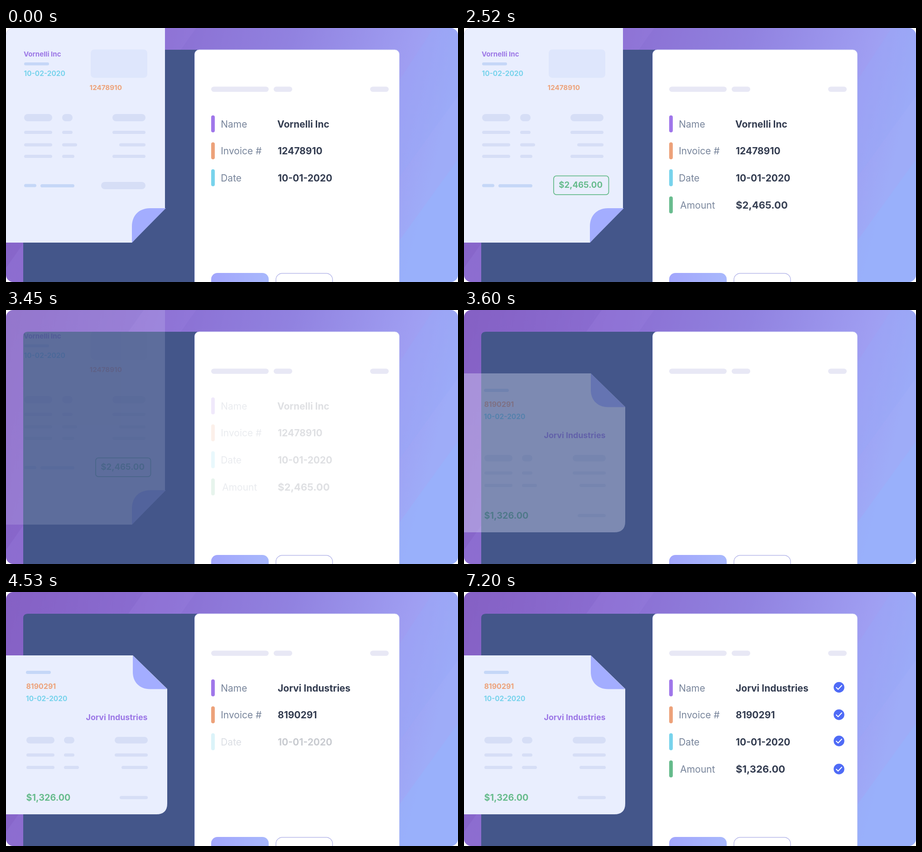
An HTML page that plays this animation: 998 px wide and 561 px high, repeating every 7.23 s.

```html
<!DOCTYPE html>
<html lang="en">
<head>
<meta charset="utf-8">
<title>Invoice capture</title>
<style>
  html, body { margin: 0; width: 100%; height: 100%; overflow: hidden; background: #fff; }
  svg { display: block; width: 998px; height: 561px; }
  text { font-family: Inter, "Open Sans", sans-serif; font-weight: 700; }
  .label { font-weight: 400; }
</style>
</head>
<body>
<svg id="stage" viewBox="0 0 998 561" xmlns="http://www.w3.org/2000/svg">
  <defs>
    <clipPath id="frame"><rect width="998" height="561" rx="16"/></clipPath>
    <linearGradient id="sky" gradientUnits="userSpaceOnUse" x1="0" y1="0" x2="960" y2="260">
      <stop offset="0" stop-color="#8560c4"/>
      <stop offset=".32" stop-color="#8a6dd1"/>
      <stop offset=".62" stop-color="#9182e0"/>
      <stop offset=".88" stop-color="#9f9ef2"/>
      <stop offset="1" stop-color="#9eacf8"/>
    </linearGradient>
    <linearGradient id="primary">
      <stop offset="0" stop-color="#a2a6fc"/>
      <stop offset="1" stop-color="#a8b8fc"/>
    </linearGradient>
  </defs>
  <g clip-path="url(#frame)">
    <rect width="998" height="561" fill="url(#sky)"/>
    <path d="M868 116L944 0H998V150L868 330Z" fill="#94a6f5" opacity=".35"/>
    <path d="M868 470L998 290V561H868Z" fill="#93b3fc" opacity=".45"/>
    <path d="M270 48L304 0H420L386 48ZM0 530L38 476V561H0Z" fill="#9a80e0" opacity=".25"/>
    <path d="M38 561V58Q38 48 48 48H430V561Z" fill="#44568a"/>
    <rect x="416.5" y="48" width="452" height="540" rx="10" fill="#fff" stroke="#cdd0f3"/>
    <g id="panel"></g>
    <rect x="453" y="541" width="127" height="40" rx="14" fill="url(#primary)"/>
    <rect x="596" y="541.8" width="125" height="40" rx="14" fill="#fff" stroke="#a9abe6" stroke-width="1.2"/>
    <g id="docA"></g>
    <g id="docB"></g>
  </g>
</svg>
<script>
const LOOP = 7230;
const PURPLE = '#9b76e6', ORANGE = '#eda27a', CYAN = '#78d3ec', GREEN = '#66bb8c';
const PAPER = '#e9eefe', BAR = '#d6def6', BLUE_BAR = '#c5d7f7', FOLD = '#a3adff';
const byId = id => document.getElementById(id);

function add(parent, tag, attrs, content) {
  const el = document.createElementNS('http://www.w3.org/2000/svg', tag);
  for (const key in attrs) el.setAttribute(key, attrs[key]);
  if (content) el.textContent = content;
  parent.appendChild(el);
  return el;
}
const group = parent => add(parent, 'g', {});
const path = (parent, d, fill) => add(parent, 'path', { d, fill });
const pill = (parent, x, y, right, height, fill = BAR) =>
  add(parent, 'rect', { x, y, width: right - x, height, rx: height / 2, fill });
const write = (parent, x, y, size, fill, content, extra) =>
  add(parent, 'text', { x, y, 'font-size': size, fill, ...extra }, content);
// Draws one table line: three pills at the same height.
const tableLine = (parent, y, height, ...spans) =>
  spans.forEach(([x, right]) => pill(parent, x, y, right, height));

// First invoice
const docA = byId('docA');
path(docA, 'M0 0H351V398L278 474H0Z', PAPER);
path(docA, 'M353 398L278 474V438C278 414 294 398 318 398Z', FOLD);
write(docA, 39, 63, 15.1, PURPLE, 'Vornelli Inc');
pill(docA, 40, 76, 95, 6.5, BLUE_BAR);
write(docA, 39.6, 105.8, 15.4, CYAN, '10-02-2020');
add(docA, 'rect', { x: 187, y: 47.5, width: 125, height: 62.5, rx: 8, fill: '#dee6fc' });
write(docA, 184.6, 137.3, 15.2, ORANGE, '12478910');
tableLine(docA, 190, 16, [40, 102], [124, 147], [235, 308]);
tableLine(docA, 227, 7, [40, 102], [124, 147], [235, 308]);
tableLine(docA, 254.5, 7, [40, 102], [124, 157], [250, 308]);
tableLine(docA, 280, 7, [40, 102], [124, 151], [235, 308]);
pill(docA, 40, 344.5, 67, 7, BLUE_BAR);
pill(docA, 76, 345, 151, 7, BLUE_BAR);
const blank = pill(docA, 210, 340, 308, 16);
const outline = add(docA, 'rect', {
  x: 198, y: 326.7, width: 121.5, height: 41.5, rx: 6,
  fill: 'none', stroke: GREEN, 'stroke-width': 1.8
});
const total = write(docA, 209.3, 353.3, 18.6, GREEN, '$2,465.00');

// Second invoice
const docB = byId('docB');
path(docB, 'M0 140H280L356 214V467Q356 491 332 491H0Z', PAPER);
path(docB, 'M280 140L356 214.5H318C295 214.5 280 199 280 177Z', FOLD);
pill(docB, 44, 174, 99, 7, BLUE_BAR);
write(docB, 44.4, 214.2, 16, ORANGE, '8190291');
write(docB, 44, 241, 15.4, CYAN, '10-02-2020');
write(docB, 312.5, 283.4, 17.8, PURPLE, 'Jorvi Industries', { 'text-anchor': 'end' });
tableLine(docB, 320, 14.5, [45, 107], [128, 151], [240, 313]);
tableLine(docB, 356.5, 7, [45, 107], [128, 151], [240, 313]);
tableLine(docB, 384, 7, [45, 107], [128, 161], [255, 313]);
pill(docB, 251, 450.5, 313, 7);
write(docB, 44.6, 461, 19.8, GREEN, '$1,326.00');

// Form panel
const panel = byId('panel');
pill(panel, 453, 129.5, 580, 11.5, '#e8e8f5');
pill(panel, 591, 129.5, 632, 11.5, '#e8e8f5');
pill(panel, 804, 129.5, 845, 11.5, '#e8e8f5');

const fields = [
  { y: 212, label: 'Name', color: '#a077ea', a: 'Vornelli Inc', b: 'Jorvi Industries', checkY: 210.5 },
  { y: 271.5, label: 'Invoice #', color: ORANGE, a: '12478910', b: '8190291', checkY: 271 },
  { y: 331, label: 'Date', color: CYAN, a: '10-01-2020', b: '10-01-2020', checkY: 329 },
  { y: 391, label: 'Amount', color: GREEN, a: '$2,465.00', b: '$1,326.00', checkY: 391 }
];
const rows = fields.map(({ y, label, color, a, b, checkY }, i) => {
  const last = i === 3;
  const row = group(panel);
  add(row, 'rect', { x: 453, y: y - 19, width: 8, height: 37.5, rx: 4, fill: color });
  write(row, last ? 477.2 : 474.2, y + 7.6, 21, '#78859b', label, { class: 'label' });
  const size = last ? 22.1 : 21;
  const value = (content, x) => write(row, x, y + 7.6, size, '#333c50', content);
  const first = value(a, i === 0 ? 599 : 600);
  const second = value(b, 600);
  const check = group(panel);
  add(check, 'circle', { r: 11.8, fill: '#4f6bf6' });
  add(check, 'path', {
    d: 'M-6 .5L-2 4.5L6 -4', fill: 'none', stroke: '#fff',
    'stroke-width': 2, 'stroke-linecap': 'round', 'stroke-linejoin': 'round'
  });
  return { row, first, second, check, checkY };
});

function ease(t, start, length) {
  const u = Math.min(1, Math.max(0, (t - start) / length));
  return u * u * (3 - 2 * u);
}
const fade = (el, value) => el.setAttribute('opacity', value.toFixed(3));

function render(t) {
  const leave = 1 - ease(t, 3270, 240);
  const amount = ease(t, 1230, 270);
  fade(docA, leave);
  fade(docB, ease(t, 3510, 230));
  fade(blank, 1 - amount);
  fade(total, amount);
  fade(outline, ease(t, 1080, 270));

  const swapped = t >= 3510;
  rows.forEach(({ row, first, second, check, checkY }, i) => {
    const shownA = i === 3 ? ease(t, 2250, 300) : 1;
    fade(row, swapped ? ease(t, 3900 + i * 270, 270) : shownA * leave);
    fade(first, swapped ? 0 : 1);
    fade(second, swapped ? 1 : 0);
    const pop = ease(t, 6720 + i * 90, 200);
    fade(check, pop);
    check.setAttribute('transform', `translate(828 ${checkY}) scale(${0.6 + 0.4 * pop})`);
  });
}

const began = performance.now();
function tick() {
  render((performance.now() - began) % LOOP);
  requestAnimationFrame(tick);
}
tick();
</script>
</body>
</html>
```
